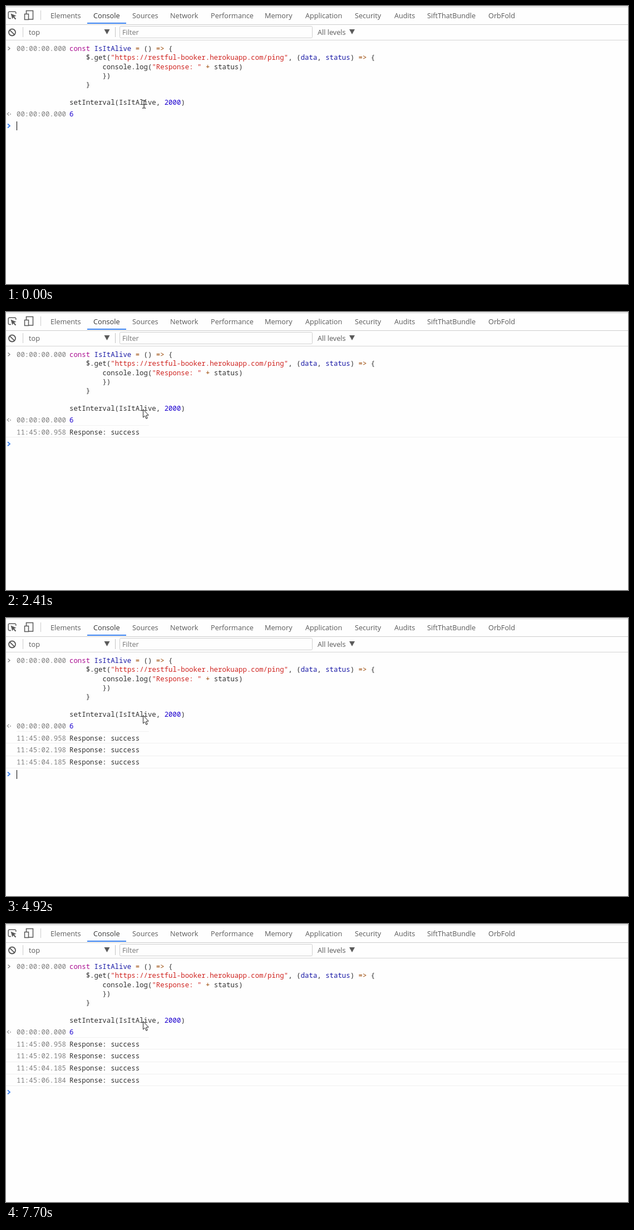
An HTML page with a canvas for the animation above (8 s loop, 1118 by 501 pixels).

```html
<!DOCTYPE html>
<html lang="en">
<head>
<meta charset="utf-8">
<title>Console</title>
<style>
html, body { margin: 0; width: 100%; height: 100%; overflow: hidden; background: #fefefe; }
canvas { display: block; }
</style>
</head>
<body>
<canvas id="stage" width="1118" height="501"></canvas>
<script>
const ctx = document.getElementById('stage').getContext('2d');
const LOOP = 8000;
const SANS = '12.7px "Open Sans", "Noto Sans", sans-serif';
const MONO = '12.37px "Noto Sans Mono", "DejaVu Sans Mono", monospace';
const CHAR = 7.422;
const GREY = '#5a5a5a', TEXT = '#303030', STAMP = '#808080', BLUE = '#3b82f0';
const KEYWORD = '#aa0d91', NAME = '#1a1aa6', STRING = '#cf2420', NUMBER = '#1c00cf', OPERATOR = '#994500';

const tabs = [
  ['Elements', 80], ['Console', 157], ['Sources', 227], ['Network', 295],
  ['Performance', 368], ['Memory', 465], ['Application', 538], ['Security', 627],
  ['Audits', 698], ['SiftThatBundle', 757], ['OrbFold', 867]
];

// Each line is [indent, [text, colour], ...].
const code = [
  [0, ['const', KEYWORD], [' IsItAlive', NAME], [' =', OPERATOR], [' () ', TEXT], ['=>', OPERATOR], [' {', TEXT]],
  [4, ['$.get(', TEXT], ['"https://restful-booker.herokuapp.com/ping"', STRING], [', (', TEXT], ['data', NAME],
    [', ', TEXT], ['status', NAME], [') ', TEXT], ['=>', OPERATOR], [' {', TEXT]],
  [8, ['console.log(', TEXT], ['"Response: "', STRING], [' +', OPERATOR], [' status)', TEXT]],
  [8, ['})', TEXT]],
  [4, ['}', TEXT]],
  [0],
  [0, ['setInterval(IsItAlive, ', TEXT], ['2000', NUMBER], [')', TEXT]]
];

const responses = [
  { at: 1670, stamp: '11:45:00.958', y: 216.5, rule: 225 },
  { at: 2940, stamp: '11:45:02.198', y: 238, rule: 248 },
  { at: 4920, stamp: '11:45:04.185', y: 260, rule: 270 },
  { at: 6760, stamp: '11:45:06.184', y: 282, rule: 291 }
];
const blinks = [400, 960, 1520, 1950, 2410, 2940, 3510, 3940, 4630, 4920, 5500, 6060, 6640, 7170, 7700];
const ARROW_AT = 1520;

function rect(x, y, w, h, color) {
  ctx.fillStyle = color;
  ctx.fillRect(x, y, w, h);
}

function text(str, x, baseline, color, font) {
  ctx.font = font;
  ctx.fillStyle = color;
  ctx.fillText(str, x, baseline);
}

const mono = (str, x, middle, color) => text(str, x, middle + 4.2, color, MONO);

function trace(points, closed) {
  ctx.beginPath();
  points.forEach(([x, y]) => ctx.lineTo(x, y));
  if (closed) ctx.closePath();
}

function stroke(points, color, width, closed) {
  trace(points, closed);
  ctx.strokeStyle = color;
  ctx.lineWidth = width;
  ctx.stroke();
}

function fill(points, color) {
  trace(points, true);
  ctx.fillStyle = color;
  ctx.fill();
}

function chevron(x, y, color, width, size = 3.5) {
  stroke([[x, y - size], [x + size + 0.5, y], [x, y + size]], color, width);
}

const dropdown = (x, y) => fill([[x, y], [x + 10, y], [x + 5, y + 9]], GREY);

function drawInspectIcon() {
  stroke([[9, 22.5], [5.5, 22.5], [4.2, 21], [4.2, 11.5], [5.5, 10.2], [16.5, 10.2], [17.8, 11.5], [17.8, 14]], GREY, 1.4);
  fill([[8.5, 13.5], [18.5, 17.8], [14.7, 19], [18.2, 23], [16.7, 24.4], [13.2, 20.4], [11.3, 23.6]], GREY);
}

function drawDeviceIcon() {
  stroke([[36.5, 14], [36.5, 8.5], [48.5, 8.5], [48.5, 24], [41, 24]], GREY, 1.5);
  stroke([[33.5, 14.5], [40.5, 14.5], [40.5, 24.5], [33.5, 24.5]], GREY, 1.5, true);
}

function drawClearIcon() {
  ctx.beginPath();
  ctx.arc(11, 47.5, 6, 0, Math.PI * 2);
  ctx.strokeStyle = GREY;
  ctx.lineWidth = 1.8;
  ctx.stroke();
  stroke([[6.8, 43.3], [15.2, 51.7]], GREY, 1.8);
}

function drawToolbars() {
  rect(0, 1, 1118, 1, '#cbcbcb');
  rect(0, 33, 1118, 1, '#cccccc');
  rect(0, 61, 1118, 1, '#d4d4d4');
  drawInspectIcon();
  drawDeviceIcon();
  rect(62, 8, 1, 17, '#cccccc');
  for (const [label, x] of tabs) text(label, x, 21.5, label === 'Console' ? '#333333' : GREY, SANS);
  rect(146, 30, 70, 2, BLUE);

  drawClearIcon();
  rect(30, 38, 1, 18, '#cccccc');
  text('top', 41, 52, GREY, SANS);
  dropdown(176.5, 42);
  rect(196, 38, 1, 18, '#c4c4c4');
  ctx.strokeStyle = '#cfcfcf';
  ctx.lineWidth = 1;
  ctx.beginPath();
  ctx.roundRect(204.5, 36.5, 346, 21, 2);
  ctx.stroke();
  text('Filter', 209, 52, '#757575', SANS);
  text('All levels', 560, 52, GREY, SANS);
  dropdown(617, 42);
}

function drawCode() {
  chevron(3.5, 76.5, '#808080', 1.3, 3);
  mono('00:00:00.000', 19, 77, STAMP);
  code.forEach(([indent, ...tokens], i) => {
    let column = indent;
    for (const [str, color] of tokens) {
      mono(str, 114 + column * CHAR, 77 + i * 16.2, color);
      column += str.length;
    }
  });
  stroke([[5.5, 191.5], [2.2, 194.5], [5.5, 197.5]], '#999999', 1.2);
  rect(7, 194, 2, 1.5, '#999999');
  mono('00:00:00.000', 19, 195, STAMP);
  mono('6', 114, 195, NUMBER);
}

function drawResponses(rows) {
  for (const { stamp, y, rule } of rows) {
    mono(stamp, 19, y, STAMP);
    mono('Response: success', 114, y, TEXT);
    rect(0, rule, 1118, 1, '#f0f0f0');
  }
}

function drawPrompt(row, caretOn) {
  chevron(3, 216 + row * 21.75, BLUE, 1.8);
  if (caretOn) rect(19, Math.round(208 + row * 21.9), 1, 16, '#000000');
}

function drawPointer(t) {
  if (t < ARROW_AT) {
    rect(247.5, 170, 1.2, 14, '#222222');
    for (const y of [169.5, 183.5]) {
      rect(245, y, 2.6, 1.2, '#222222');
      rect(248.6, y, 2.6, 1.2, '#222222');
    }
    rect(246.5, 177, 3.2, 1, '#222222');
    return;
  }
  const outline = [[246.5, 175.5], [246.5, 190], [249.7, 187], [252, 192.3], [254.2, 191.3], [252, 186.2], [256.3, 186]];
  fill(outline, '#ffffff');
  stroke(outline, '#222222', 1, true);
  rect(19, 204, 238, 1, '#f2f2f2');
}

function draw(t) {
  rect(0, 0, 1118, 501, '#fefefe');
  drawToolbars();
  drawCode();
  const rows = responses.filter(r => t >= r.at);
  drawResponses(rows);
  const caretOn = blinks.filter(at => t >= at).length % 2 === 0;
  drawPrompt(rows.length, caretOn);
  drawPointer(t);
}

const start = performance.now();
function tick() {
  draw((performance.now() - start) % LOOP);
  requestAnimationFrame(tick);
}
tick();
</script>
</body>
</html>
```
